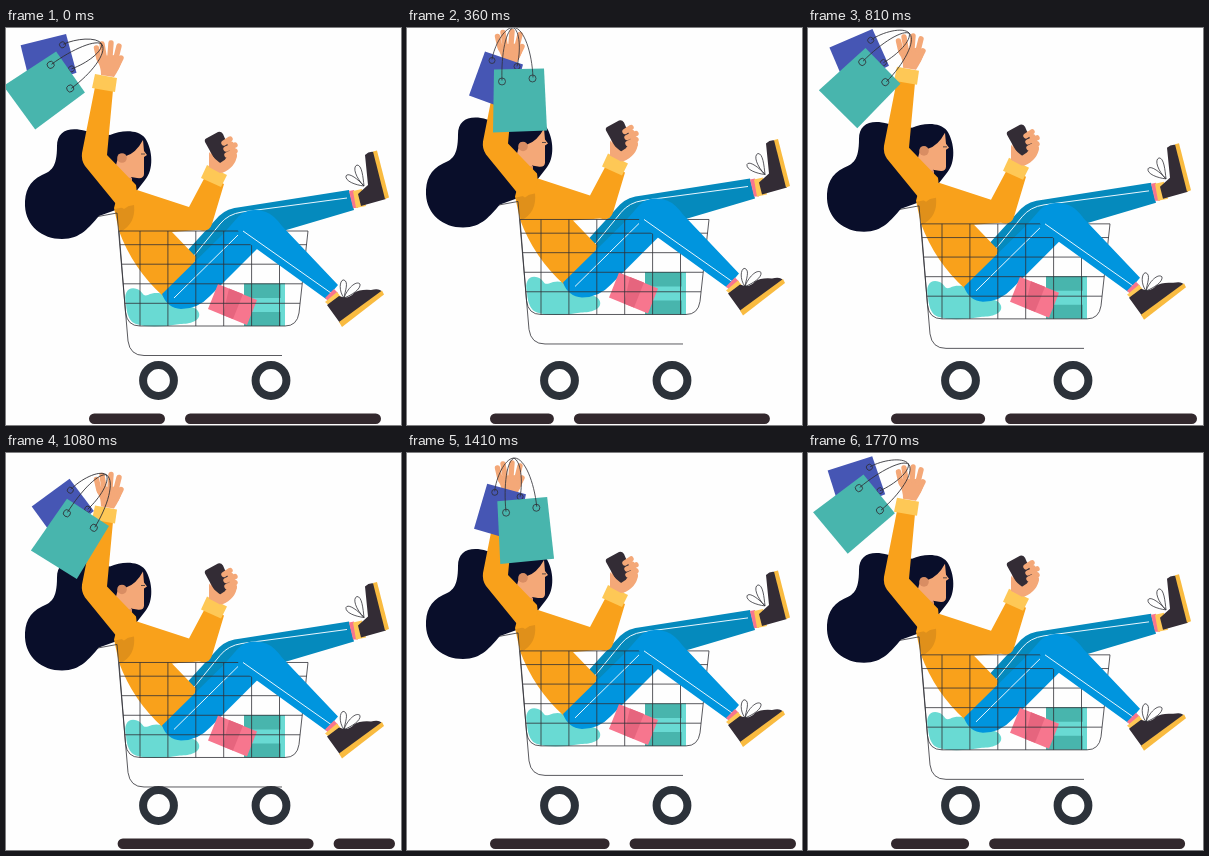
An HTML page that plays this animation: 395 px wide and 397 px high, repeating every 1.8 s.

```html
<!DOCTYPE html>
<html lang="en">
<head>
<meta charset="utf-8">
<title>Shopping cart ride</title>
<style>
  html, body { margin: 0; width: 100%; height: 100%; overflow: hidden; background: #fefefe; }
  svg { display: block; width: 100vw; height: 100vh; }
  .line { fill: none; stroke: #303036; stroke-width: .8; }
  .seam { fill: none; stroke: #e8f6fd; stroke-width: 1; }
  .skin { fill: #f4a878; }
  .finger { fill: none; stroke: #f4a878; stroke-width: 5.4; stroke-linecap: round; }
  .navy { fill: #090e2a; }
  .orange { fill: #f9a11b; }
  .shade { fill: #e0901a; }
  .yellow { fill: #fec856; }
  .sole { fill: #f9bb40; }
  .shoe { fill: #332c35; }
  .blue { fill: #0095de; }
  .deep { fill: #058abd; }
  .teal { fill: #48b5ad; }
  .mint { fill: #69dad3; }
  .pink { fill: #f7768e; }
  .rose { fill: #e6657e; }
</style>
</head>
<body>
<svg viewBox="0 0 395 397" preserveAspectRatio="none">
  <path id="road" d="M88.250 390.750H383.750" stroke="#32282d" stroke-width="10.5" stroke-linecap="round" stroke-dasharray="185.5 30.5"/>

  <g fill="#fefefe" stroke="#2c323a" stroke-width="8">
    <circle cx="152.5" cy="352.5" r="15.4"/>
    <circle cx="265" cy="352.5" r="15.4"/>
  </g>

  <g id="rider">
    <!-- hair and face -->
    <path class="navy" d="M80 103C63 98 51 103 51 118C51 140 45 143 36 147C23 153 18.500 164 19 178C20 198 36 211 56 211C75 211 83 199 93 188L118 179L139 152C148 142 147 122 139 110C132 101 115 102 104 107Z"/>
    <path class="skin" d="M137 112L138 123L141 127L138 129L138 146Q138 151 131 150L125 149V160L131 166L110 166L107 148L113 126L120 128Q130 125 137 112Z"/>
    <path d="M109 148Q116 151 126 149.500V154Q119 161 110 158Z" fill="#d98d63"/>
    <circle cx="116" cy="130" r="4.800" fill="#d98d63"/>
    <path class="line" d="M135 126H139"/>

    <!-- things in the basket -->
    <path class="mint" d="M120 276C117 264 123 258 131 261C137 263 136 269 142 267C150 263 160 265 168 273C178 281 190 276 193 285C195 293 184 296 174 296Q145 301 130 296Q121 293 120 276Z"/>
    <path class="teal" d="M238 255.500H279V298H238Z"/>
    <path class="mint" d="M238 270H275V255.500H279V298H275V284H238Z"/>

    <!-- far leg -->
    <path class="deep" d="M181 223L213 188Q221 180 235 179L343 162L348 182L250 211L194 240Z"/>
    <path class="seam" d="M187 229L214 196Q222 186 236 184L341 170"/>
    <path class="pink" d="M343 163L348 162L352 180L347 180Z"/>
    <path class="yellow" d="M347 163L356 161L360 178L350 180Z"/>
    <path class="shoe" d="M352 166L362 157L359 127Q363 123 368 124L380 171L355 178Z"/>
    <path class="sole" d="M367 123.500L371 122.500L383 169.500L379 171Z"/>
    <path class="line" d="M358 158C349 157 339 153 340 148C342 144 351 150 358 158C350 150 346 139 351 137C356 137 357 149 358 158"/>

    <!-- torso and near arm -->
    <path class="orange" d="M112 165L131 162L183 179L200 147L218 156L206 196Q203 205 193 202L166 204L190 229L180 268H157Q127 241 113 203L108 180Z"/>
    <path class="shade" d="M109 181L128 177Q130 196 114 204Z"/>
    <path class="yellow" d="M201 137L221 147L215 159L195 150Z"/>
    <path class="skin" d="M204 120L205 130L203 139L216 145Q230 139 231 127L227 114L215 109Z"/>
    <path class="shoe" d="M201 110L212 104Q215 103 217 106L226 127L214 135Q211 136 209 132L199 114Q198 111 201 110Z"/>
    <path class="skin" d="M203 124Q208 131 217 137L224 131L223 140L214 145L203 139Z"/>
    <path class="finger" d="M218 115L224 111M220 121L229 117M221 127L229 123M222 132L228 128"/>

    <!-- near thigh -->
    <path class="blue" d="M156 266L218 205L232 189Q241 179 258 184L275 202L251 221L204 268Q192 281 175 281Q161 280 156 266Z"/>
    <path class="seam" d="M168 270L232 207"/>
    <path class="pink" d="M212 256L251 272L241 297L202 281Z"/>
    <path class="rose" d="M223 260.500L237 266L227 291L217 287Z"/>

    <!-- basket -->
    <path id="mesh" class="line"/>
    <path class="line" d="M92 188.500L111 185L122 313Q124 327.500 138 327.500H276M113 203L119.500 284Q121 298 134 298H279Q291 298 293 285L302 203"/>

    <!-- near shin -->
    <path class="blue" d="M228 196Q240 177 260 184Q268 187 276 198L332 257L320 271L237 211Z"/>
    <path class="seam" d="M237 203L325 265"/>
    <path class="pink" d="M328 261L332 265L323 274L319 270Z"/>
    <path class="yellow" d="M331 264L335 269L325 279L319 274Z"/>
    <path class="shoe" d="M321 277L333 268Q342 272 348 265Q354 261 365 262Q374 260 376 264L334 295Z"/>
    <path class="sole" d="M333 294L376 262.500L378 266.500L336 299Z"/>
    <path class="line" d="M338 270C332 262 334 251 338 252C343 254 339 263 338 270C341 261 350 252 354 256C355 261 346 267 338 270"/>

    <!-- raised arm -->
    <path class="orange" d="M89 59L107 62L101 127L130 157Q133 172 118 181L110 176L79 138Q75 132 76 125Z"/>
    <path class="yellow" d="M89 46L111 50L109 64L86 60Z"/>
    <path class="skin" d="M91 28L111 27L116 32Q114 40 108 49L95 47Q95 38 91 33Z"/>
    <path class="finger" d="M93 31L90.500 20M98 28L96 16M104 28L105 15M110 30L113 18M110 40L115 30"/>

    <!-- bags, drawn hanging almost straight -->
    <g id="bags">
      <path d="M78 35L116 48L103 94L62 79Z" fill="#4656b4"/>
      <path class="line" d="M85 43C87 30 97 11 106 11C113 14 114 34 110 50"/>
      <circle class="line" cx="85" cy="44" r="3"/>
      <circle class="line" cx="110" cy="50" r="3"/>
      <path class="teal" d="M87 53L137 52L140 114L86 116Z"/>
      <path class="line" d="M95 64C94 38 99 12 107 11C117 12 125 36 126 61"/>
      <circle class="line" cx="95" cy="65" r="3.500"/>
      <circle class="line" cx="125.500" cy="62" r="3.500"/>
    </g>
  </g>
</svg>
<script>
  const CYCLE = 900, STEP = 30, PITCH = 216;
  const get = id => document.getElementById(id);

  // Basket mesh: the sides lean inward toward the bottom.
  let mesh = '';
  for (const y of [203, 216.7, 236.2, 255.8, 275.3]) {
    const drop = y - 203;
    mesh += `M${113 + drop * 0.08} ${y}H${302 - drop * 0.11}`;
  }
  for (let x = 134; x < 280; x += 27.9) mesh += `M${x} 203V298`;
  get('mesh').setAttribute('d', mesh);

  const ease = p => p * p * (3 - 2 * p);

  // Values are evenly spaced over one cycle, eased between neighbours.
  function track(keys, p) {
    const pos = p * (keys.length - 1), i = Math.floor(pos);
    return keys[i] + (keys[i + 1] - keys[i]) * ease(pos - i);
  }

  const BOB = [0, 8.5, -11, -12.5, 8.5, -11, 0];
  const SWING = [56, -6.5, 53];
  const DRIFT = [0, 0, 4];   // the bags slip up the hand, then drop back at once

  function draw(now) {
    const p = Math.floor(now % CYCLE / STEP) * STEP / CYCLE;
    const slip = track(DRIFT, p);
    get('rider').setAttribute('transform', `translate(0 ${track(BOB, p)})`);
    get('bags').setAttribute('transform',
      `translate(${slip} ${-slip}) rotate(${track(SWING, p)} 96.3 3.6)`);
    get('road').setAttribute('stroke-dashoffset', 120 + ease(p) * PITCH * 3);
  }

  const start = performance.now();
  function tick() {
    draw(performance.now() - start);
    requestAnimationFrame(tick);
  }
  tick();
</script>
</body>
</html>
```
